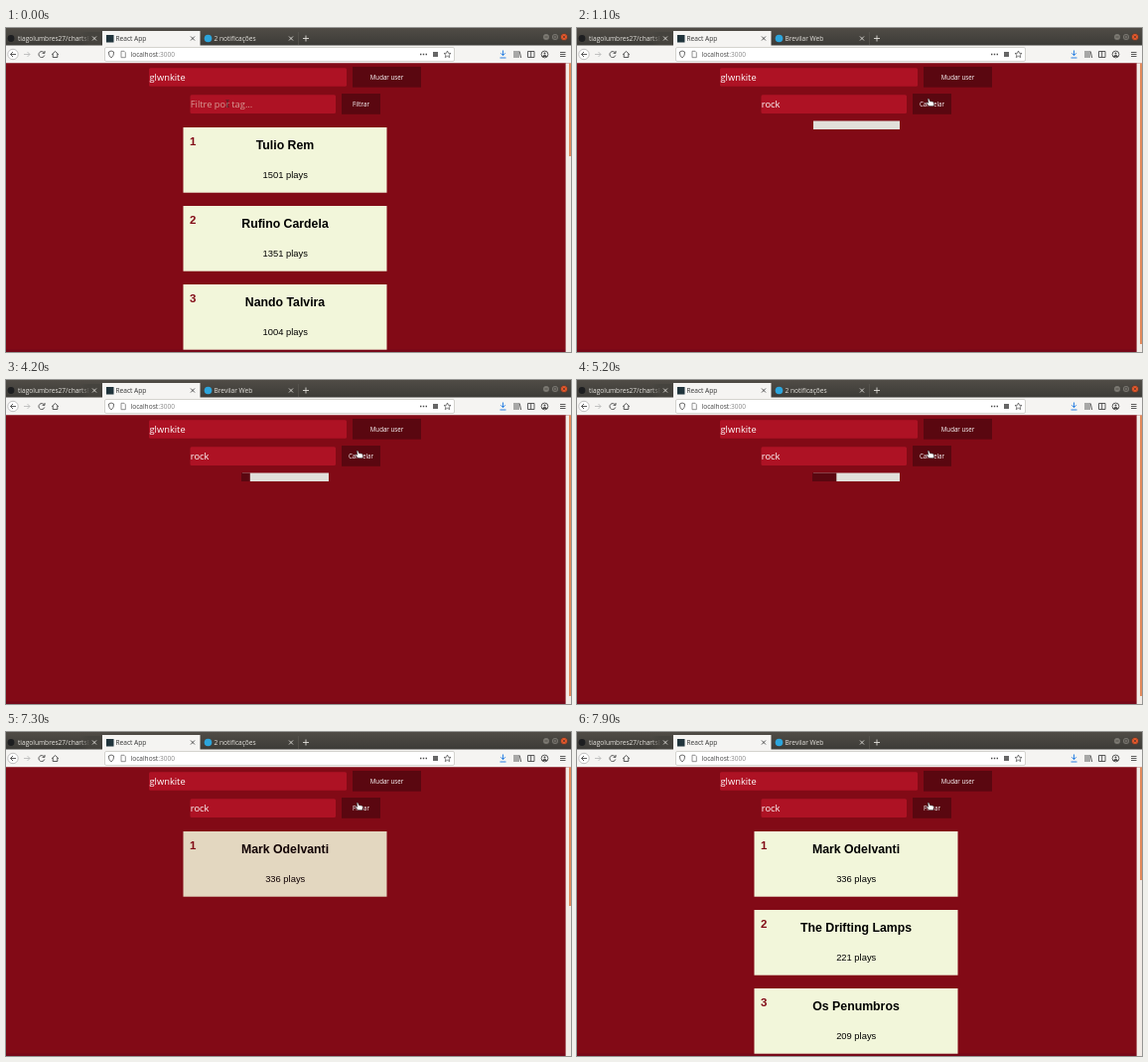
These frames come from a looping animation (569x326 px, 8 s). An HTML page:

```html
<!DOCTYPE html>
<html lang="pt">
<head>
<meta charset="utf-8">
<title>Charts</title>
<style>
  html, body { margin: 0; width: 100%; height: 100%; overflow: hidden; background: #820a16; }
  svg { display: block; width: 569px; height: 326px; }
  text { font-family: "Open Sans", "Noto Sans", sans-serif; white-space: pre; }
  .ui { font-size: 6.6px; }
  .field { font-size: 9.3px; font-weight: 500; fill: #fff; }
  .btn { font-size: 6.2px; font-weight: 500; fill: #fff; text-anchor: middle; }
  .card text { font-family: "Liberation Sans", Arial, sans-serif; text-anchor: middle; }
  .card .rank { font-size: 11.5px; font-weight: bold; fill: #820a16; text-anchor: start; }
  .card .name { font-size: 12.3px; font-weight: bold; }
  .card .plays { font-size: 9.4px; }
  .line { fill: none; stroke: #4a4a4a; stroke-width: .9; }
</style>
</head>
<body>
<svg viewBox="0 0 569 326">
  <defs>
    <linearGradient id="bar" x2="0" y2="1">
      <stop stop-color="#504c46"/><stop offset="1" stop-color="#3c3b37"/>
    </linearGradient>
    <linearGradient id="fade">
      <stop stop-color="#45433e" stop-opacity="0"/><stop offset="1" stop-color="#45433e"/>
    </linearGradient>
  </defs>

  <!-- window and tabs -->
  <rect width="569" height="18" fill="url(#bar)"/>
  <circle cx="5" cy="10.5" r="3.4" fill="#1d1e20"/>
  <text class="ui" x="12" y="13" fill="#e4e2dd">tiagolumbres27/chartsBy</text>
  <rect x="75" y="4" width="9" height="13" fill="url(#fade)"/>
  <rect x="84" y="4" width="12" height="13" fill="#45433e"/>
  <rect x="97" y="3" width="98.5" height="15" fill="#f5f4f2"/>
  <rect x="101" y="7" width="7.5" height="7.5" fill="#20343c"/>
  <text class="ui" x="110.5" y="13" fill="#333">React App</text>
  <circle cx="203.5" cy="10.5" r="3.8" fill="#2ca5dc"/>
  <text class="ui" id="tab" x="209.5" y="13" fill="#e4e2dd"></text>
  <path d="M294.5 4v13" stroke="#5b5852" stroke-width=".7"/>
  <g class="line" style="stroke:#dedcd7">
    <path d="M87 8.5l4 4m0-4l-4 4M285 8.5l4 4m0-4l-4 4M299 10.5h6m-3-3v6"/>
    <path d="M186 8.5l4 4m0-4l-4 4" stroke="#444"/>
  </g>
  <g stroke="#33312e" stroke-width=".6">
    <circle cx="544" cy="9" r="3.5" fill="#7d7a73"/>
    <circle cx="553" cy="9" r="3.5" fill="#7d7a73"/>
    <circle cx="562" cy="9" r="3.5" fill="#e8582a"/>
    <path d="M542.5 9h3M551.7 7.7h2.6v2.6h-2.6zM560.7 7.7l2.6 2.6m0-2.6l-2.6 2.6" fill="none"/>
  </g>

  <!-- toolbar -->
  <rect y="17.5" width="569" height="18" fill="#f5f4f2"/>
  <rect x="99.5" y="19.5" width="352" height="14" rx="1.5" fill="#fff" stroke="#cbc9c5" stroke-width=".8"/>
  <text class="ui" x="125.5" y="28.9" fill="#444">localhost<tspan fill="#888">:3000</tspan></text>
  <g class="line">
    <circle cx="7" cy="26.5" r="5.2" fill="#fff" stroke="#aaa" stroke-width=".7"/>
    <path d="M10 26.5H4.5m2.5-2.5l-2.5 2.5 2.5 2.5"/>
    <path d="M18 26.5h6m-2.5-2.5l2.5 2.5-2.5 2.5" stroke="#bbb"/>
    <path d="M38.5 25a3 3 0 1 0 .3 2.5M39 23v2.4h-2.4"/>
    <path d="M46 26.8l3.5-3.3 3.5 3.3M47.2 26v3.5h4.6V26"/>
    <path d="M103.5 24l2.5-1 2.5 1c0 3-.5 4.5-2.5 5.8-2-1.3-2.5-2.8-2.5-5.8z" stroke-width=".8"/>
    <path d="M116 23.3h3l1.3 1.4v5H116z" stroke="#777" stroke-width=".8"/>
    <path d="M417 26.5h7" stroke-width="1.4" stroke-dasharray="1.4"/>
    <rect x="430" y="24" width="5" height="5" fill="#666" stroke="none"/>
    <path d="M444.5 23l1 2.3 2.5.2-1.9 1.6.6 2.5-2.2-1.3-2.2 1.3.6-2.5-1.9-1.6 2.5-.2z" stroke-width=".7"/>
    <path d="M500.5 22.5v5m-2.3-2.2l2.3 2.4 2.3-2.4M497.5 30h6" stroke="#1674e0"/>
    <path d="M512 23v7m2-7v7m2-7v7m1.2-6.5l1.5 6.5"/>
    <path d="M525.5 23.5h6.5v6h-6.5zm3.2 0v6"/>
    <circle cx="542.5" cy="26.5" r="3.4"/>
    <path d="M540.3 29c.5-2 3.9-2 4.4 0" fill="#4a4a4a"/>
    <circle cx="542.5" cy="25.5" r="1" fill="#4a4a4a" stroke="none"/>
    <path d="M558 24.5h5.5m-5.5 2h5.5m-5.5 2h5.5"/>
  </g>

  <!-- page -->
  <rect y="35.5" width="564" height="291" fill="#820a16"/>
  <rect y="323.5" width="564" height="3" fill="#73081a" opacity=".7"/>
  <g fill="#ae1224">
    <rect x="144" y="40.3" width="199" height="18.5" rx="1.5"/>
    <rect x="185.5" y="67.3" width="146.5" height="18.7" rx="1.5"/>
  </g>
  <g fill="#5a0710">
    <rect x="349" y="39" width="69" height="20.7"/>
    <rect x="338" y="66" width="39" height="20.8"/>
  </g>
  <text class="field" x="144.5" y="52.8">glwnkite</text>
  <text class="field" id="tag" x="185.8" y="80"></text>
  <text class="btn" x="383.5" y="51.7">Mudar user</text>
  <text class="btn" id="filter" x="357.5" y="78.7"></text>
  <g id="loader">
    <rect x="238" y="93.5" width="87" height="8.5" fill="#e1dfda"/>
    <rect id="fill" x="237" y="93.5" height="8.5" fill="#5a0710"/>
  </g>
  <g id="list"></g>
  <rect x="563.6" y="35.5" width="6" height="291" fill="#f1ebe6"/>
  <rect id="thumb" x="567" y="35.5" width="2" fill="#e28a5c"/>

  <!-- pointers -->
  <path id="beam" class="line" d="M-1.5-3.5Q0-3.5 0-2.5V2.5Q0 3.5-1.5 3.5M1.5-3.5Q0-3.5 0-2.5M0 2.5Q0 3.5 1.5 3.5" style="stroke:#3a2529;stroke-width:.8"/>
  <path id="hand" d="M-1.8-4.2q.9-.7 1.5.5l.8 2 2.6.3q1.3.3 1.2 1.6L4 3H-.4L-3 .2q-.2-1 .9-.8l1 .6z" fill="#fff" stroke="#222" stroke-width=".5"/>
</svg>
<script>
const $ = id => document.getElementById(id);
const LOOP = 8000, STEP = 100, SEARCH = 1000, RESULT = 7100;
const before = [["Tulio Rem", 1501], ["Rufino Cardela", 1351], ["Nando Talvira", 1004]];
const after = [["Mark Odelvanti", 336], ["The Drifting Lamps", 221], ["Os Penumbros", 209]];
const tabFlips = [1100, 2300, 3500, 4600, 5700, 6800, 7900];

// Piecewise linear value through [time, value] points.
function track(t, points) {
  const i = points.findIndex(p => p[0] > t);
  if (i < 0) return points[points.length - 1][1];
  if (!i) return points[0][1];
  const [t0, a] = points[i - 1], [t1, b] = points[i];
  return a + (b - a) * (t - t0) / (t1 - t0);
}

const card = ([name, plays], i, opacity) => `
  <g class="card" transform="translate(178.5 ${100 + 79 * i})" opacity="${opacity}">
    <rect width="205" height="65.7" fill="#f2f6da"/>
    <text class="rank" x="6.5" y="17.6">${i + 1}</text>
    <text class="name" x="102.5" y="22.4">${name}</text>
    <text class="plays" x="102.7" y="51.4">${plays} plays</text>
  </g>`;

function place(id, x, y, shown) {
  $(id).setAttribute("transform", `translate(${x} ${y})`);
  $(id).style.display = shown ? "" : "none";
}

function draw(t) {
  const loading = t >= SEARCH && t < RESULT;
  const flips = tabFlips.filter(f => t >= f).length;
  $("tab").textContent = flips % 2 ? "Brevilar Web" : "2 notificações";

  const typed = "rock".slice(0, Math.max(0, Math.floor((t - 200) / 100)));
  $("tag").textContent = typed || "Filtre por tag...";
  $("tag").style.fill = typed ? "#fff" : "#d79a94";
  $("filter").textContent = loading ? "Cancelar" : "Filtrar";

  $("loader").style.display = loading ? "" : "none";
  const done = track(t, [[3600, 0], [4200, .1], [4600, .1], [6200, .57], [6500, 1]]);
  $("fill").setAttribute("width", 88 * done);

  const fadeIn = i => track(t, [[RESULT + 225 * i, 0], [RESULT + 225 * i + 230, 1]]);
  $("list").innerHTML = loading ? "" : t < SEARCH
    ? before.map((c, i) => card(c, i, 1)).join("")
    : after.map((c, i) => card(c, i, fadeIn(i))).join("");

  const thumbEnd = loading ? 318 : t < SEARCH ? 129
    : track(t, [[RESULT, 185], [7500, 165], [7900, 149]]);
  $("thumb").setAttribute("height", thumbEnd - 35.5);

  const x = track(t, [[600, 223], [900, 355]]);
  place("beam", x, 76, x < 335);
  place("hand", x, 75.5, x >= 335);
}

function tick(now) {
  draw(Math.floor(now % LOOP / STEP) * STEP);
  requestAnimationFrame(tick);
}
draw(0);
requestAnimationFrame(tick);
</script>
</body>
</html>
```
